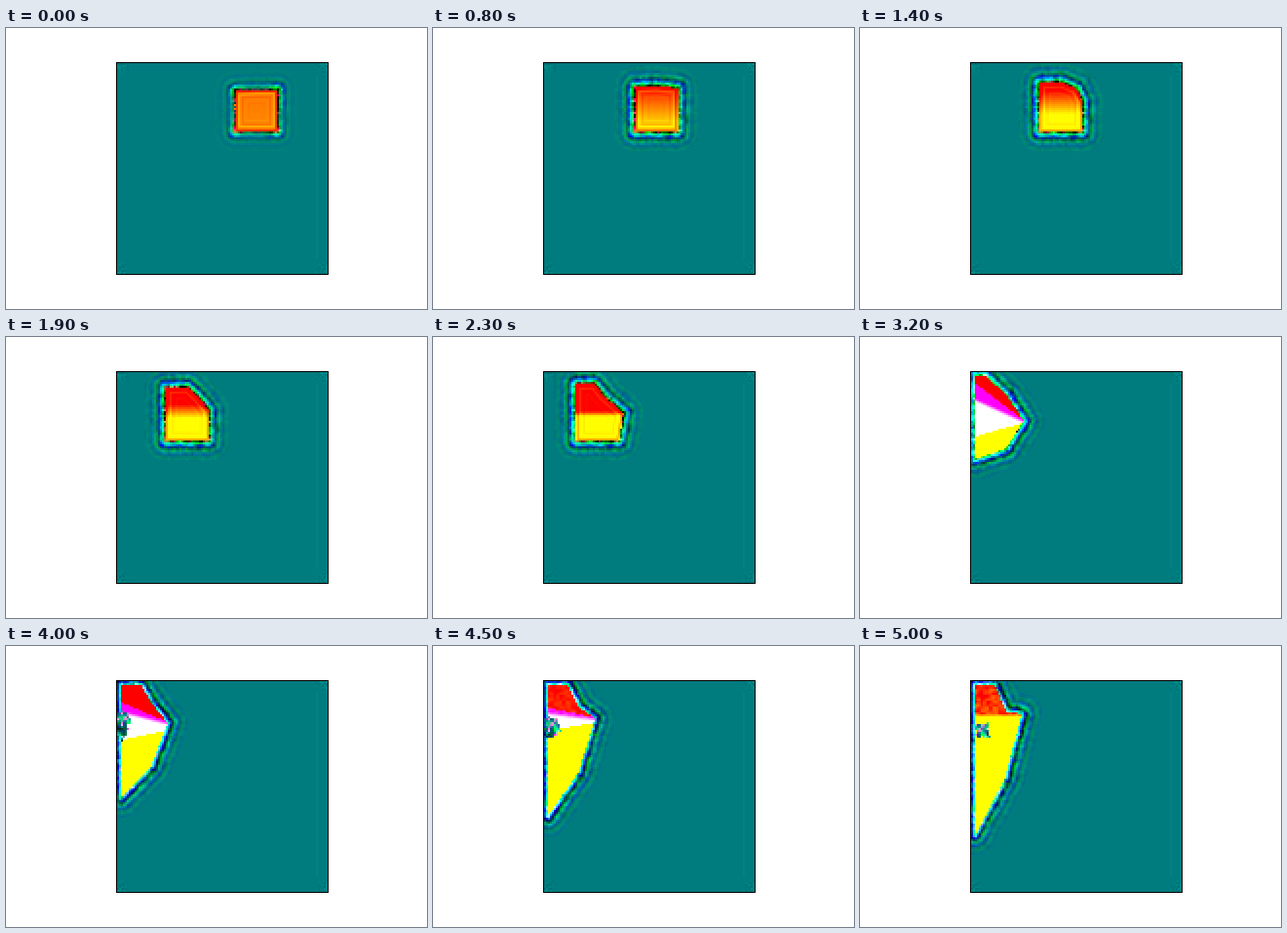
Recreate the animation shown at these times as an HTML page with a canvas. Size 432 px wide and 288 px high, loop 5.1 s.

```html
<!DOCTYPE html>
<html lang="en">
<head>
<meta charset="utf-8">
<title>Advected square</title>
<style>
html, body { margin: 0; width: 100%; height: 100%; overflow: hidden; background: #fff; }
canvas { display: block; }
</style>
</head>
<body>
<canvas id="stage" width="432" height="288"></canvas>
<script>
const ctx = document.getElementById('stage').getContext('2d');
const STEP = 100, COUNT = 51, CELL = 2, N = 108, LEFT = 114, TOP = 36;
const SIZE = N * CELL, WALL = 118, SIDE = 44, REACH = 22;

const clamp = (v, lo = 0, hi = 1) => Math.min(hi, Math.max(lo, v));
const mix = (a, b, k) => a + (b - a) * k;
const ramp = (s, from, to) => clamp((s - from) / (to - from));

function hash(x, y, seed) {
  let h = Math.imul(x + 11, 374761393) ^ Math.imul(y + 7, 668265263) ^ Math.imul(seed + 3, 1274126177);
  h = Math.imul(h ^ (h >>> 13), 1103515245);
  return ((h ^ (h >>> 16)) >>> 0) / 4294967296;
}

// value noise, 0 to 1
function noise(x, y, seed) {
  const i = Math.floor(x), j = Math.floor(y), u = x - i, v = y - j;
  return mix(mix(hash(i, j, seed), hash(i + 1, j, seed), u),
             mix(hash(i, j + 1, seed), hash(i + 1, j + 1, seed), u), v);
}

// The square drifts left, meets the wall and is smeared down along it.
function bodyAt(s) {
  const drift = 235 - 33 * s - 2.3 * s * s;
  const left = Math.max(WALL, drift), right = Math.max(149, drift + SIDE);
  const top = Math.max(39, 63 - 3 * s - 1.6 * s * s);
  const hit = Math.max(0, s - 3.2);
  const topX = left + 22 - 12 * ramp(s, 1.9, 3.2) + 10 * ramp(s, 3.2, 4);
  const shoulder = {
    x: Math.max(150, drift + SIDE - 15 * ramp(s, .8, 2.3)),
    y: top + 20 * ramp(s, .5, 3.2) + 8 * ramp(s, 4, 5)
  };
  const tip = {
    x: Math.max(166, drift + SIDE + 18 * ramp(s, 2, 3.2)),
    y: mix(75, 86, ramp(s, 2, 3.2)) - 9 * hit
  };
  const outline = [
    { x: left, y: 106 + 38 * Math.max(0, s - 2.7) },
    { x: left, y: top + 1 },
    { x: topX, y: top },
    shoulder,
    tip,
    { x: right, y: 106 + 12 * Math.max(0, s - 2.5) }
  ];
  const open = ramp(s, 2.4, 3.2) * (1 - ramp(s, 3.2, 5));
  return { drift, tip, outline, open, hit };
}

// signed distance to a closed polygon, negative inside
function distance(pts, x, y) {
  let best = 1e9, inside = false, a = pts[pts.length - 1];
  for (const b of pts) {
    const ex = b.x - a.x, ey = b.y - a.y;
    const k = clamp(((x - a.x) * ex + (y - a.y) * ey) / (ex * ex + ey * ey || 1));
    best = Math.min(best, Math.hypot(x - a.x - ex * k, y - a.y - ey * k));
    if ((a.y > y) !== (b.y > y) && x < a.x + ex * (y - a.y) / ey) inside = !inside;
    a = b;
  }
  return inside ? -best : best;
}

function cornerness(pts, x, y) {
  const near = Math.min(...pts.map((p, i) => i === 2 ? 1e9 : Math.hypot(x - p.x, y - p.y)));
  return Math.exp(-near * near / 80);
}

// Red, white and yellow meet in a fan that opens from the tip.
function fillColor(x, y, d, s, body, n) {
  const { tip, open, hit } = body, u = x - tip.x, v = y - tip.y;
  const slope = .45 * ramp(s, 2.3, 3.2) - .25 * hit;
  const soft = Math.max(2, 28 - 11 * s);
  const k = clamp((v - 1 - slope * u + 8 * (1 - ramp(s, 0, .5))) / soft / 2 + .5);
  const low = 100 * (1 - ramp(s, 0, .8));
  const high = clamp(135 + 85 * s, 0, 255);
  const fresh = 1 - ramp(s, 2.3, 3.2);
  let g = mix(low, high, k) + fresh * 130 * Math.sin(d) * Math.exp(d / 4);
  g += (1 - k) * ramp(s, 4, 5) * 170 * Math.max(0, n[1] - .3);
  const blue = open > 0 && v > .75 * open * u - 1 &&
               v < -.28 * Math.sqrt(open) * u + 2 + 10 * ramp(s, 3.2, 4) * open;
  return [255, g, blue ? 255 : 0];
}

// damped oscillation around the teal ground
function ringColor(d, s, amp, n) {
  const e = Math.exp(-d / 6.5) * amp, late = 2.4 * ramp(s, 2.8, 3.6);
  const wave = (pitch, phase, k) => e * (170 * Math.sin(d * pitch + phase + late) + (k - .5) * 340 * amp);
  const r = 255 * amp * clamp(1 - d / 3) * clamp(n[2] * 3 - 1.4);
  return [r, 124 + wave(.8, -1.6 + n[0], n[1]), 126 + wave(.7, -2.6 + n[1], n[2])];
}

function cellColor(i, j, s, body) {
  const x = LEFT + (i + .5) * CELL, y = TOP + (j + .5) * CELL;
  const d = distance(body.outline, x, y);
  if (d > REACH) return null;
  const shift = Math.max(body.drift, WALL - 20);
  const n = [0, 1, 2].map(k => noise((x - shift) / 3, (y - 12 * body.hit) / 3, k));

  const move = ramp(s, 4, 5);
  const px = mix(119, 126, move), py = mix(80, 87, move);
  const patch = ramp(s, 3.2, 4) * Math.exp(-(((x - px) / 10) ** 2) - ((y - py) / mix(17, 11, move)) ** 2);
  if (patch > .3 + n[0] * .5) return [255 * clamp(n[1] * 4 - 2.4), 300 * n[2], 255 * n[1]];

  if (d < 0) return fillColor(x, y, d, s, body, n);
  const amp = mix(.4 + .6 * cornerness(body.outline, x, y), 1, ramp(s, 0, .9));
  return ringColor(d, s, amp, n);
}

function put(i, j, color) {
  ctx.fillStyle = `rgb(${color.map(v => Math.round(clamp(v, 0, 255))).join()})`;
  ctx.fillRect(LEFT + i * CELL, TOP + j * CELL, CELL, CELL);
}

function drawGround() {
  ctx.fillStyle = '#fff';
  ctx.fillRect(0, 0, 432, 288);
  ctx.fillStyle = '#000';
  ctx.fillRect(LEFT - 1, TOP - 1, SIZE + 2, SIZE + 2);
  ctx.fillStyle = 'rgb(0,124,126)';
  ctx.fillRect(LEFT, TOP, SIZE, SIZE);
  ctx.fillStyle = 'rgb(4,129,131)';
  ctx.fillRect(318, TOP + 10, 2, SIZE - 26);
  for (const cx of [0, N - 1]) for (const cy of [0, N - 1]) {
    for (let i = 0; i < 6; i++) for (let j = 0; j < 6; j++) {
      const v = (hash(i + cx, j + cy, 1) - .5) * 50 * Math.exp(-(i + j) / 5);
      put(Math.abs(cx - i), Math.abs(cy - j), [0, 124 + v, 126 + v * .7]);
    }
  }
}

function draw(step) {
  const s = step * STEP / 1000, body = bodyAt(s);
  drawGround();
  for (let j = 0; j < N; j++) for (let i = 0; i < N; i++) {
    const color = cellColor(i, j, s, body);
    if (color) put(i, j, color);
  }
}

const origin = performance.now();
let shown = -1;
function tick() {
  const step = Math.floor((performance.now() - origin) / STEP) % COUNT;
  if (step !== shown) draw(shown = step);
  requestAnimationFrame(tick);
}
tick();
</script>
</body>
</html>
```
